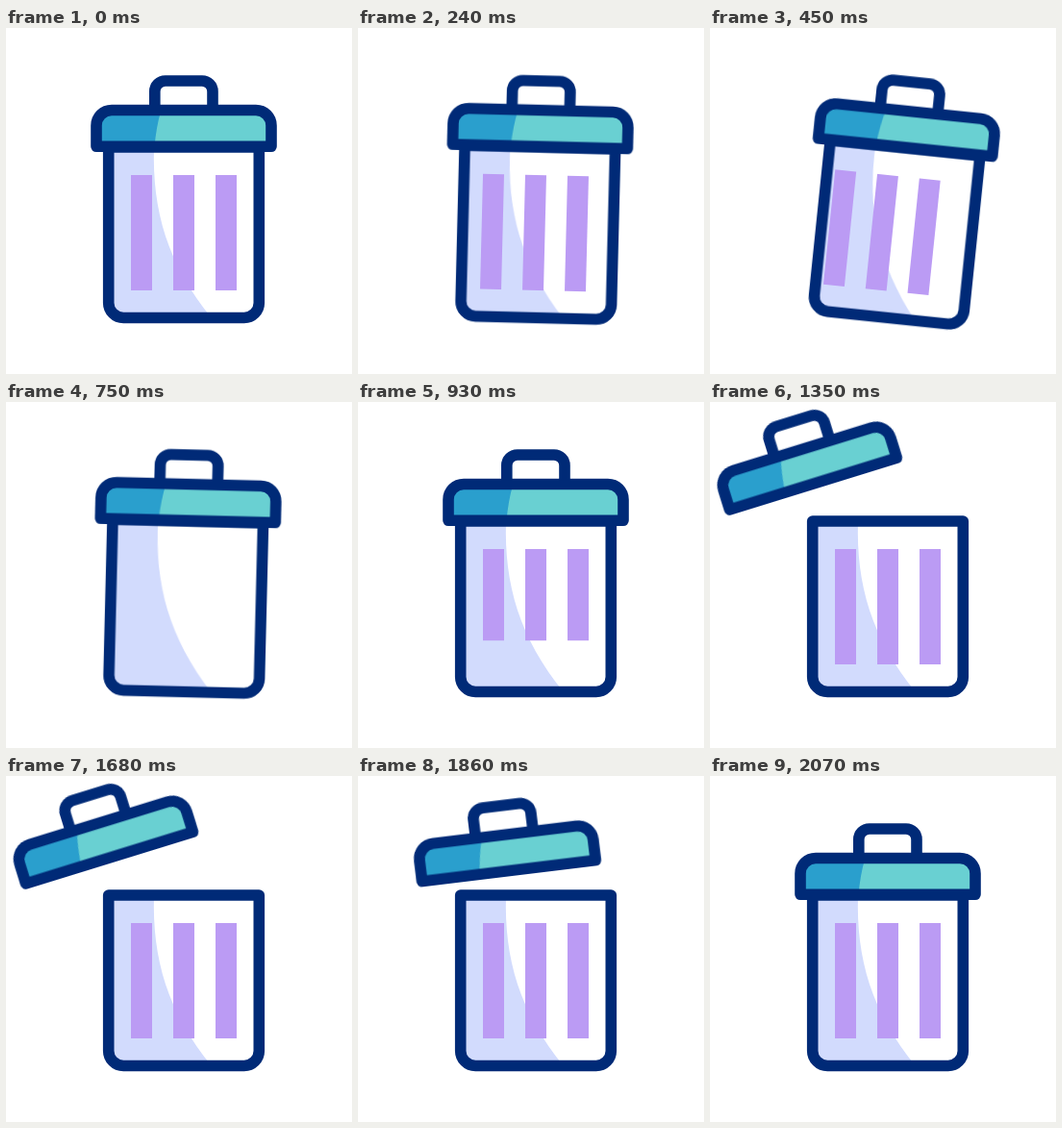
These frames come from a looping animation (360x360 px, 2.1 s). An HTML page:

```html
<!DOCTYPE html>
<html lang="en">
<head>
<meta charset="utf-8">
<title>Trash bin</title>
<style>
  html, body { margin: 0; width: 100%; height: 100%; overflow: hidden; background: #fff; }
  svg { display: block; width: 100vw; height: 100vh; }

  .line { fill: none; stroke: #002a77; stroke-width: 11.6; stroke-linejoin: round; }
  .tilt, .lid, .bars { animation: 2.1s linear infinite; }

  .tilt {
    transform-origin: 185px 300px;
    animation-name: shake;
    animation-timing-function: cubic-bezier(.37, 0, .63, 1);
  }
  .hung { transform-origin: 185px 153px; }
  .lid { transform-origin: 185px 104px; animation-name: open; }
  .bars {
    transform-origin: 185px 153px;
    animation-name: retract;
    animation-timing-function: ease-in-out;
  }

  @keyframes shake {
    0%, 44.29%, 48.57%, 61.43%, 100% { transform: rotate(0deg); }
    9.05% { transform: rotate(3deg); }
    17.14% { transform: rotate(-4.7deg); }
    23.57% { transform: rotate(9.2deg); }
    30.71% { transform: rotate(-7.5deg); }
    37.38% { transform: rotate(2.8deg); }
    54.29% { transform: rotate(1.8deg); }
  }
  @keyframes open {
    0%, 48.57%, 95.71%, 100% { transform: translate(0px, 0px) rotate(0deg); }
    51.43% { transform: translate(-9px, -9.5px) rotate(-2.7deg); }
    54.29% { transform: translate(-32px, -24px) rotate(-7.5deg); }
    57.14% { transform: translate(-60px, -33px) rotate(-13deg); }
    61.43%, 80% { transform: translate(-83.3px, -37.3px) rotate(-17.2deg); }
    82.86% { transform: translate(-72px, -37px) rotate(-15deg); }
    87.14% { transform: translate(-40px, -30px) rotate(-9deg); }
    91.43% { transform: translate(-12px, -14px) rotate(-3deg); }
  }
  @keyframes retract {
    0%, 25.71%, 47.62%, 100% { transform: scaleY(1); }
    34.29%, 37.14% { transform: scaleY(0); }
  }
</style>
</head>
<body>
<svg viewBox="0 0 360 360">
  <defs>
    <path id="bin" d="M106.7 124H263.3V286a15.5 15.5 0 0 1-15.5 15.5H122.2a15.5 15.5 0 0 1-15.5-15.5Z"/>
    <path id="cap" d="M94 123.3V101.5a16 16 0 0 1 16-16H260a16 16 0 0 1 16 16V123.3Z"/>
    <clipPath id="inBin"><use href="#bin"/></clipPath>
    <clipPath id="inCap"><use href="#cap"/></clipPath>
  </defs>

  <g class="tilt">
    <use href="#bin" fill="#fff"/>
    <path clip-path="url(#inBin)" fill="#d2dbfd" d="M106 124H154C152 190 168 245 214 302H106Z"/>
  </g>

  <g class="tilt hung">
    <path class="bars" fill="#bb9bf4" d="M130 153h22v120h-22zM174 153h22v120h-22zM218 153h22v120h-22z"/>
  </g>

  <g class="tilt">
    <use href="#bin" class="line"/>
    <g class="lid">
      <path class="line" d="M154.8 85V66a11 11 0 0 1 11-11H204a11 11 0 0 1 11 11V85"/>
      <use href="#cap" fill="#69d0d2"/>
      <path clip-path="url(#inCap)" fill="#2a9fcd" d="M94 85H161.5Q156 104 154.5 124H94Z"/>
      <use href="#cap" class="line"/>
    </g>
  </g>
</svg>
</body>
</html>
```
